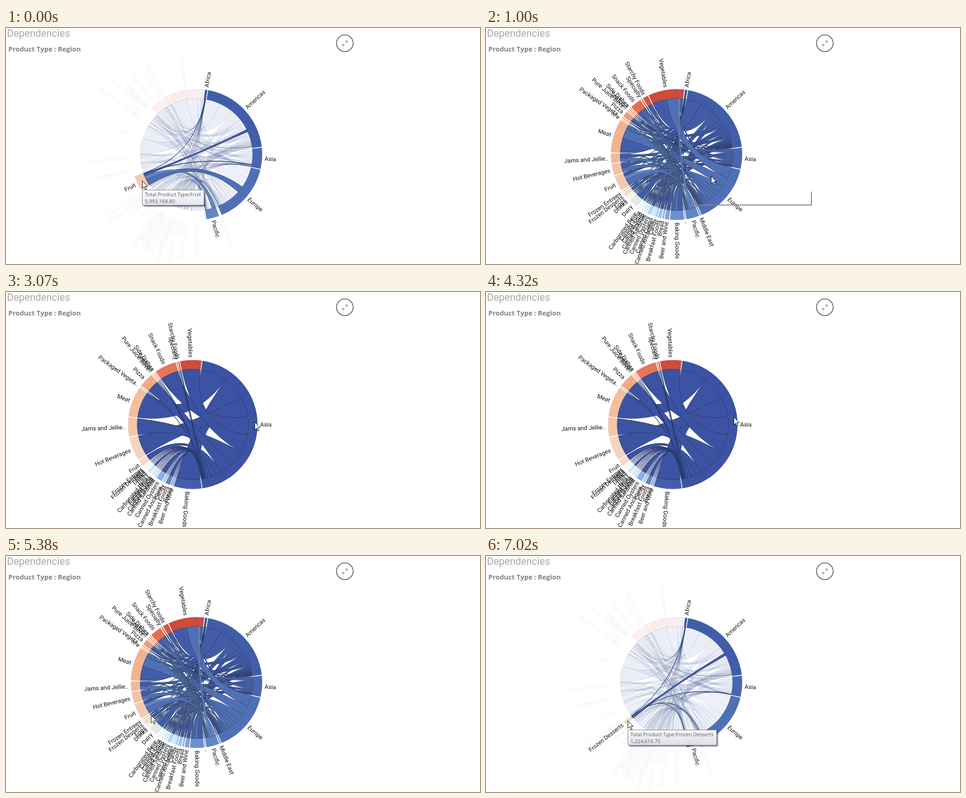
These frames come from a looping animation (1024x512 px, 8000 ms). An HTML page with a canvas:

```html
<!DOCTYPE html>
<html lang="en">
<head>
<meta charset="utf-8">
<title>Dependencies</title>
<style>
  html, body { margin: 0; width: 100%; height: 100%; overflow: hidden; background: #fff; }
  canvas { display: block; width: 1024px; height: 512px; }
</style>
</head>
<body>
<canvas id="stage" width="1024" height="512"></canvas>
<script>
const ctx = document.getElementById('stage').getContext('2d');
const TAU = Math.PI * 2, PAD = 0.02, LOOP = 8000;

// product, then weight per region: Americas, Europe, Asia, optional Pacific
const products = [
  ['Baking Goods', 5, 3.7, 2.8], ['Beer and Wine', 2.3, 1, .03], ['Bread', .8, .3, .03],
  ['Breakfast Foods', 1.5, .75, .45], ['Candy', .7, .4, .03], ['Canned Anchovies', .25, .12, .02],
  ['Canned Clams', .2, .08, 0], ['Canned Oysters', 1.6, .95, .6], ['Canned Sardines', .3, .15, .02],
  ['Canned Shrimp', .4, .15, .02], ['Canned Soup', .6, .2, .02], ['Canned Tuna', .2, .08, .01],
  ['Carbonated Beverages', 1, .5, .02], ['Dairy', 6, 1.7, .25], ['Drinks', .4, .15, .01],
  ['Eggs', .6, .3, .02], ['Frozen Desserts', 2.5, .4, .03], ['Frozen Entrees', .6, .3, .02],
  ['Fruit', 2.4, 6.7, .65, 3.9], ['Hot Beverages', 2.5, 4.4, 2.4], ['Jams and Jellies', 2.3, 3.8, 1.92],
  ['Meat', 15, 10.3, 3.1, 1], ['n/a', 0, 0, 0], ['Packaged Vegetables', .3, .15, .06],
  ['Pizza', 2, 1.3, 1.45], ['Pure Juice Beverages', .25, .1, .02], ['Seafood', .25, .1, .02],
  ['Side Dishes', .25, .1, .02], ['Snack Foods', 4.4, 2.7, 2.18], ['Specialty', .45, .2, .03],
  ['Starchy Foods', 3, 1.3, .08], ['Vegetables', 14.8, 11.4, 2.15, 2.8]
];

function weights([name, am, eu, as, pa = .05 * (am + eu)]) {
  return {
    Africa: .013 * (am + eu), Americas: am, Asia: as, Europe: eu,
    'Middle East': as > 1 ? .07 : 0, Pacific: pa, '-': name === 'n/a' ? .1 : 0
  };
}

const ramp = [
  [0, 0x3b53a2], [.079, 0x5070b5], [.13, 0x6285c3], [.184, 0x6d90ce], [.26, 0x9fc3e8],
  [.37, 0xb5d6f0], [.5, 0xe6f5fc], [.526, 0xe8e8ea], [.56, 0xfdf3d6], [.6, 0xf1dac8],
  [.635, 0xf2d5c1], [.66, 0xf3c9ad], [.74, 0xf0b28f], [.82, 0xec9a70], [.92, 0xe07050], [1, 0xcf4b3c]
];

function color(t, shade = 1) {
  const i = Math.max(1, ramp.findIndex(stop => stop[0] >= t));
  const [t0, a] = ramp[i - 1], [t1, b] = ramp[i], k = (t - t0) / (t1 - t0);
  const part = s => {
    const u = a >> s & 255, v = b >> s & 255;
    return Math.round((u + (v - u) * k) * shade);
  };
  return `rgb(${part(16)},${part(8)},${part(0)})`;
}

function makeChart(regions, x, y, outer, inner) {
  const links = [];
  for (const region of regions)
    for (const row of products) {
      const value = weights(row)[region];
      if (value > 0) links.push({ region, product: row[0], value });
    }
  const used = [...regions, ...products.map(row => row[0])]
    .filter(name => links.some(l => l.region === name || l.product === name));
  const total = links.reduce((sum, l) => sum + l.value, 0);
  const span = (TAU - used.length * PAD) / 2;
  const start = (Math.PI - span - (regions.length - 1) * PAD) / 2;
  let angle = start;
  const groups = used.map((name, i) => {
    const from = angle, side = regions.includes(name) ? 'region' : 'product';
    links.filter(l => l[side] === name).sort((a, b) => b.value - a.value).forEach(l => {
      const next = angle + l.value / total * span;
      l[side + 'Arc'] = [angle, next];
      angle = next;
    });
    const to = angle, mid = (from + to) / 2;
    angle += PAD;
    return { name, from, to, mid, flip: mid - start > Math.PI, t: i / (used.length - 1) };
  });
  for (const l of links) l.t = groups.find(g => g.name === l.region).t;
  return { x, y, outer, inner, groups, links };
}

const charts = {
  all: makeChart(['Africa', 'Americas', 'Asia', 'Europe', 'Middle East', 'Pacific', '-'], 411.5, 274.5, 141.5, 121.5),
  asia: makeChart(['Asia'], 403.5, 287.5, 139.5, 120)
};

const turn = a => a - Math.PI / 2;
const point = (a, r) => [Math.sin(a) * r, -Math.cos(a) * r];

function drawLink(l, r) {
  const [a0, a1] = l.regionArc, [b0, b1] = l.productArc;
  ctx.beginPath();
  ctx.arc(0, 0, r, turn(a0), turn(a1));
  ctx.quadraticCurveTo(0, 0, ...point(b0, r));
  ctx.arc(0, 0, r, turn(b0), turn(b1));
  ctx.quadraticCurveTo(0, 0, ...point(a0, r));
  ctx.closePath();
  ctx.fillStyle = color(l.t);
  ctx.strokeStyle = color(l.t, .7);
  ctx.fill();
  ctx.stroke();
}

function drawGroup(g, c) {
  ctx.beginPath();
  ctx.arc(0, 0, c.outer, turn(g.from), turn(g.to));
  ctx.arc(0, 0, c.inner, turn(g.to), turn(g.from), true);
  ctx.closePath();
  ctx.fillStyle = ctx.strokeStyle = color(g.t);
  ctx.fill();
  ctx.stroke();
}

function drawLabel(g, c) {
  const text = g.name.length > 15 ? g.name.slice(0, 15) + '..' : g.name;
  ctx.save();
  ctx.rotate(turn(g.mid));
  ctx.translate(c.outer + 6, 0);
  if (g.flip) ctx.rotate(Math.PI);
  ctx.textAlign = g.flip ? 'right' : 'left';
  ctx.fillStyle = '#151515';
  ctx.fillText(text, 0, 4.4);
  ctx.restore();
}

function drawChart(c, hover, amount) {
  const touches = l => l.region === hover || l.product === hover;
  const near = new Set([hover]);
  c.links.filter(touches).forEach(l => near.add(l.region).add(l.product));
  const dim = 1 - .9 * amount, labelDim = 1 - .95 * amount;
  ctx.save();
  ctx.translate(c.x, c.y);
  ctx.lineWidth = 1;
  ctx.font = '12.7px Roboto, sans-serif';
  for (const g of c.groups) {
    const lit = near.has(g.name), pale = g.t > .18 && g.t < .9;
    ctx.globalAlpha = lit ? 1 : pale ? 1 - amount : dim;
    drawGroup(g, c);
    ctx.globalAlpha = lit ? 1 : labelDim;
    drawLabel(g, c);
  }
  for (const l of c.links) {
    ctx.globalAlpha = touches(l) ? 1 : dim;
    drawLink(l, c.inner);
  }
  ctx.restore();
}

function write(text, x, y, font, fill) {
  ctx.font = font;
  ctx.fillStyle = fill;
  ctx.fillText(text, x, y);
}

function path(points) {
  ctx.beginPath();
  points.forEach(([x, y]) => ctx.lineTo(x, y));
}

function drawHeader() {
  write('Dependencies', 2, 19, '21.7px Roboto, sans-serif', '#a9a9a9');
  write('Product Type : Region', 5, 51, 'bold 14.6px "Open Sans", sans-serif', '#808080');
  ctx.strokeStyle = '#6f6f6f';
  ctx.lineWidth = 2;
  ctx.beginPath();
  ctx.arc(732, 33, 18, 0, TAU);
  ctx.stroke();
  ctx.lineWidth = 1.2;
  for (const s of [1, -1]) {
    path([[1.5, -1.5], [4.5, -4.5]].map(([x, y]) => [732.3 + s * x, 33.2 + s * y]));
    ctx.stroke();
    path([[1.5, -4.8], [4.8, -4.8], [4.8, -1.5]].map(([x, y]) => [732.3 + s * x, 33.2 + s * y]));
    ctx.stroke();
  }
}

function drawTip([title, value], x, y, alpha) {
  const font = '11px "Open Sans", sans-serif';
  ctx.save();
  ctx.globalAlpha = alpha;
  ctx.font = font;
  const w = ctx.measureText(title).width + 12, h = 34;
  const fill = ctx.createLinearGradient(0, y, 0, y + h);
  fill.addColorStop(0, '#ffffff');
  fill.addColorStop(1, '#e4e5f0');
  ctx.beginPath();
  ctx.roundRect(x + .5, y + .5, w, h - 1, 2.5);
  ctx.shadowColor = 'rgba(0,0,0,.6)';
  ctx.shadowBlur = 3;
  ctx.shadowOffsetX = ctx.shadowOffsetY = 2.5;
  ctx.fillStyle = fill;
  ctx.fill();
  ctx.shadowColor = 'transparent';
  ctx.strokeStyle = '#767676';
  ctx.lineWidth = 1;
  ctx.stroke();
  write(title, x + 6, y + 14, font, '#575757');
  write(value, x + 6, y + 29, font, '#575757');
  ctx.restore();
}

function drawTrace() {
  ctx.lineWidth = 2;
  ctx.strokeStyle = '#858585';
  path([[440, 384], [703, 384], [703, 355]]);
  ctx.stroke();
}

function drawCursor([x, y]) {
  path([[0, 0], [0, 16.5], [3.8, 13], [6.5, 19], [9, 18], [6.4, 12], [11.5, 12]]
    .map(([dx, dy]) => [x + .5 + dx, y + .5 + dy]));
  ctx.closePath();
  ctx.fillStyle = '#fff';
  ctx.strokeStyle = '#000';
  ctx.lineWidth = 1;
  ctx.fill();
  ctx.stroke();
}

const tips = {
  fruit: ['Total Product Type:Fruit', '5,993,168.80'],
  pair: ['Total Product Type:Fruit, Total Region:Pacific', '1,706,085.25'],
  asia: ['Total Region:Asia', '7,934,521.36'],
  frozen: ['Total Product Type:Frozen Desserts', '1,224,616.75']
};

// each step keeps whatever it does not set
const steps = [
  [0, { chart: 'all', hover: 'Fruit', amount: 1, cursor: [294, 331], tip: 'fruit', tipAlpha: 1 }],
  [730, { cursor: [437, 331], tip: 'pair' }],
  [870, { cursor: [462, 326], tip: null, amount: .5, trace: true }],
  [1000, { cursor: [486, 321], amount: 0 }],
  [1120, { cursor: [508, 308] }],
  [1240, { cursor: [523, 295], trace: false }],
  [1390, { cursor: [530, 287] }],
  [1540, { cursor: [537, 282], hover: 'Asia', amount: .3 }],
  [1670, { amount: .7 }],
  [1810, { amount: .97 }],
  [1930, { amount: 1 }],
  [2300, { tip: 'asia', tipAlpha: .6 }],
  [2450, { tipAlpha: 1 }],
  [2770, { tip: null }],
  [3070, { chart: 'asia' }],
  [4170, { cursor: [536, 273] }],
  [4320, { cursor: [535, 271] }],
  [4920, { chart: 'all' }],
  [5070, { cursor: null }],
  [5230, { cursor: [313, 345], amount: .4 }],
  [5380, { amount: 0 }],
  [5520, { hover: 'Frozen Entrees', amount: .6 }],
  [5680, { amount: .9 }],
  [5840, { amount: 1 }],
  [5980, { cursor: [305, 353], amount: .4 }],
  [6100, { amount: 0 }],
  [6230, { cursor: [306, 357], hover: 'Frozen Desserts', amount: .5 }],
  [6380, { amount: 1 }],
  [6900, { tip: 'frozen', tipAlpha: .6 }],
  [7020, { tipAlpha: .95 }]
];

function draw(now) {
  const time = now % LOOP;
  const s = Object.assign({}, ...steps.filter(([at]) => at <= time).map(step => step[1]));
  ctx.fillStyle = '#fff';
  ctx.fillRect(0, 0, 1024, 512);
  drawHeader();
  drawChart(charts[s.chart], s.hover, s.amount);
  if (s.trace) drawTrace();
  if (s.tip) drawTip(tips[s.tip], s.cursor[0], s.cursor[1] + 20, s.tipAlpha);
  if (s.cursor) drawCursor(s.cursor);
}

let began;
function tick(now) {
  began ??= now;
  draw(now - began);
  requestAnimationFrame(tick);
}
draw(0);
requestAnimationFrame(tick);
</script>
</body>
</html>
```
